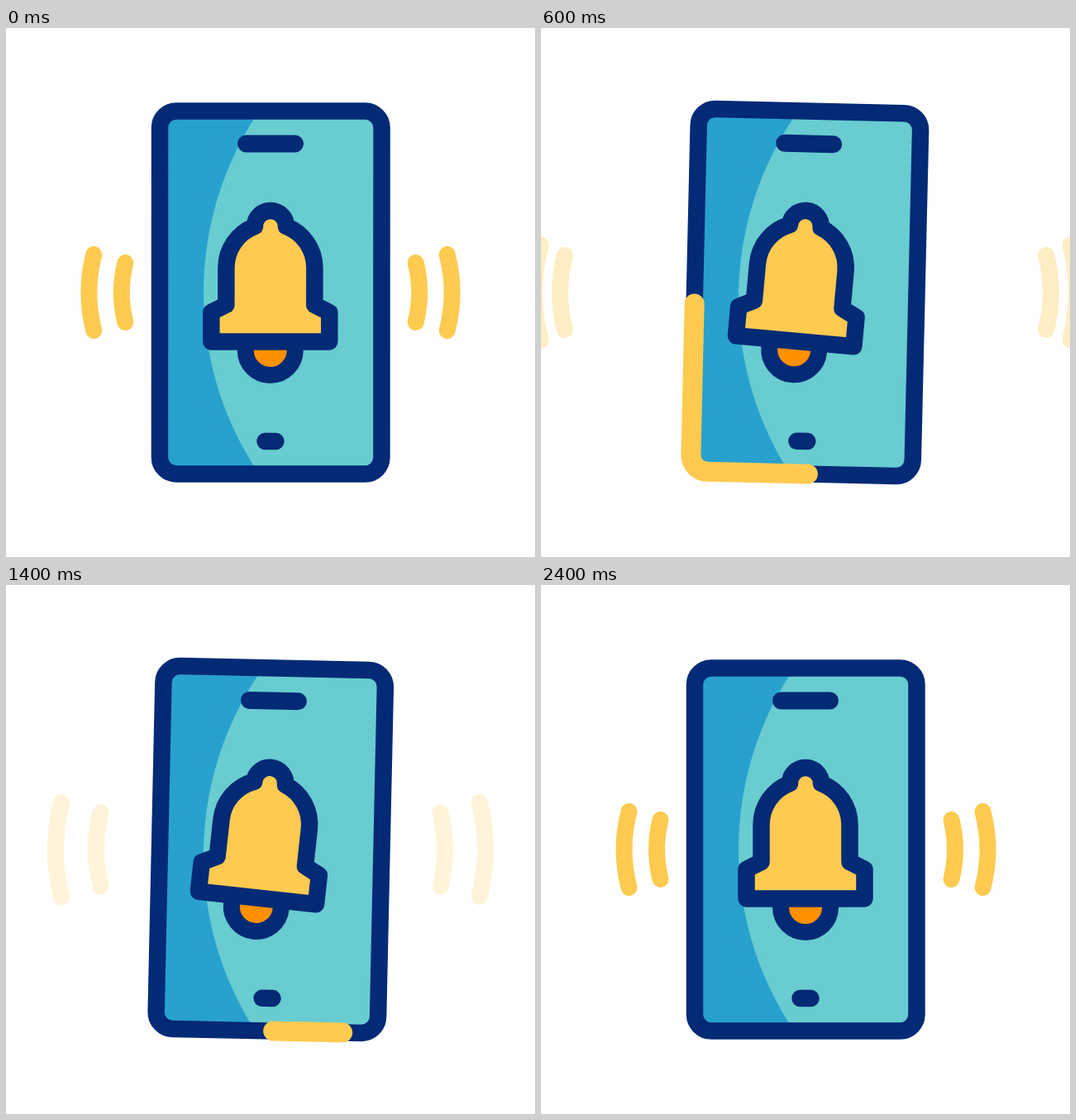
An HTML page with a canvas that plays this animation: 640x640 px, repeating every 2600 ms.

```html
<!DOCTYPE html>
<html lang="en">
<head>
<meta charset="utf-8">
<title>Ringing phone</title>
<style>
  html, body { margin: 0; width: 100%; height: 100%; overflow: hidden; background: #fff; }
  canvas { display: block; }
</style>
</head>
<body>
<canvas id="stage" width="640" height="640"></canvas>
<script>
const ctx = document.getElementById('stage').getContext('2d');
const NAVY = '#032a75', YELLOW = '#ffca50', BLUE = '#28a1ce', TEAL = '#68ccd1', ORANGE = '#ff9100';
const LOOP = 2600, END = 2400;
const RAD = Math.PI / 180;

// The frame runs clockwise from a point near the bottom centre.
const FRAME = new Path2D('M328 539.5H206a20 20 0 0 1 -20 -20V120.5a20 20 0 0 1 20 -20H434.5' +
  'a20 20 0 0 1 20 20V519.5a20 20 0 0 1 -20 20H328');
const FRAME_LENGTH = 1380;
const BELL = new Path2D('M248.5 379.5V344L266.5 335V290A53.5 53.5 0 0 1 301 240' +
  'A19 19 0 0 1 339 240A53.5 53.5 0 0 1 373.5 290V335L391.5 344V379.5Z');
const CLAPPER = new Path2D('M290 390a30 30 0 0 1 60 0a30 30 0 0 1 -60 0');
const SPEAKER = new Path2D('M290.5 140H349.5');
const BUTTON = new Path2D('M313.5 500H326.5');
const GLOW = new Path2D('M300 110A392 392 0 0 0 300 530H445V110Z');

// Swing phases: [time, phase]
const PHONE_PHASE = [[0, .5], [220, 1], [880, 4], [1180, 5.667], [1400, 6.712], [1760, 8.315], [2160, 10.5]];
const BELL_PHASE = [[0, 0], [885, 4], [1716, 8], [2160, 10]];

function phaseAt(keys, t) {
  for (let i = 1; i < keys.length; i++) {
    const [t0, p0] = keys[i - 1], [t1, p1] = keys[i];
    if (t < t1) return p0 + (p1 - p0) * (t - t0) / (t1 - t0);
  }
  return keys[keys.length - 1][1];
}

function ease(t, from, to) {
  const p = Math.min(1, Math.max(0, (t - from) / (to - from)));
  return (1 - Math.cos(Math.PI * p)) / 2;
}

function stroke(path, color, width) {
  ctx.strokeStyle = color;
  ctx.lineWidth = width;
  ctx.stroke(path);
}

function fill(path, color) {
  ctx.fillStyle = color;
  ctx.fill(path);
}

function rotateAround(x, y, degrees) {
  ctx.translate(x, y);
  ctx.rotate(degrees * RAD);
  ctx.translate(-x, -y);
}

function waveState(t) {
  if (t < 900) {
    const p = t / 360;
    return { outer: 100.5 - 65 * p, inner: 140 - 70 * p, scale: 1 + .15 * p, alpha: 1 - t / 900, drift: 0 };
  }
  let mid, scale, alpha = 1, drift = 0;
  if (t > 960 && t < 1540) {
    const q = ((1540 - t) / 580) ** 2;
    mid = 74.25 + 177 * q;
    scale = 1.29 - .84 * q;
    alpha = (1540 - t) / 640;
  } else if (t > 1790) {
    const q = ((END - t) / 610) ** 2;
    mid = 120.25 + 131 * q;
    scale = 1 - .55 * q;
    drift = 1;
  } else return null;
  return { outer: mid - 19.75 * scale, inner: mid + 19.75 * scale, scale, alpha, drift };
}

function drawWaves(t) {
  const w = waveState(t);
  if (!w) return;
  ctx.globalAlpha = w.alpha;
  const arc = (x, half, bend, side) => {
    const h = half * w.scale, b = bend * w.scale;
    const at = dx => side < 0 ? x + dx : 640 + w.drift - x - dx;
    const path = new Path2D();
    path.moveTo(at(b), 320 - h);
    path.quadraticCurveTo(at(-b), 320, at(b), 320 + h);
    stroke(path, YELLOW, 20);
  };
  for (const side of [-1, 1]) {
    arc(w.outer, 46, 6, side);
    arc(w.inner, 36, 4.5, side);
  }
  ctx.globalAlpha = 1;
}

function drawOutline(t) {
  const drawn = ease(t, 440, 930), erased = ease(t, 930, 1490);
  if (drawn <= erased) return;
  ctx.setLineDash([(drawn - erased) * FRAME_LENGTH, 2 * FRAME_LENGTH]);
  ctx.lineDashOffset = -erased * FRAME_LENGTH;
  stroke(FRAME, YELLOW, 24);
  ctx.setLineDash([]);
}

function drawPhone(t) {
  ctx.save();
  rotateAround(320, 320, -2 * Math.cos(Math.PI * phaseAt(PHONE_PHASE, t)));
  fill(FRAME, BLUE);
  fill(GLOW, TEAL);
  stroke(FRAME, NAVY, 20.5);
  drawOutline(t);
  stroke(SPEAKER, NAVY, 21);
  const flash = (t > 240 && t < 500) || (t > 1600 && t < 1900);
  stroke(BUTTON, flash ? '#fff' : NAVY, flash ? 24 : 20.5);

  rotateAround(320, 210, 5 * Math.sin(Math.PI * phaseAt(BELL_PHASE, t)));
  fill(CLAPPER, ORANGE);
  stroke(CLAPPER, NAVY, 20);
  fill(BELL, YELLOW);
  stroke(BELL, NAVY, 20.5);
  ctx.restore();
}

function draw() {
  const t = Math.min(performance.now() % LOOP, END);
  ctx.clearRect(0, 0, 640, 640);
  ctx.lineCap = ctx.lineJoin = 'round';
  drawWaves(t);
  drawPhone(t);
  requestAnimationFrame(draw);
}
draw();
</script>
</body>
</html>
```
